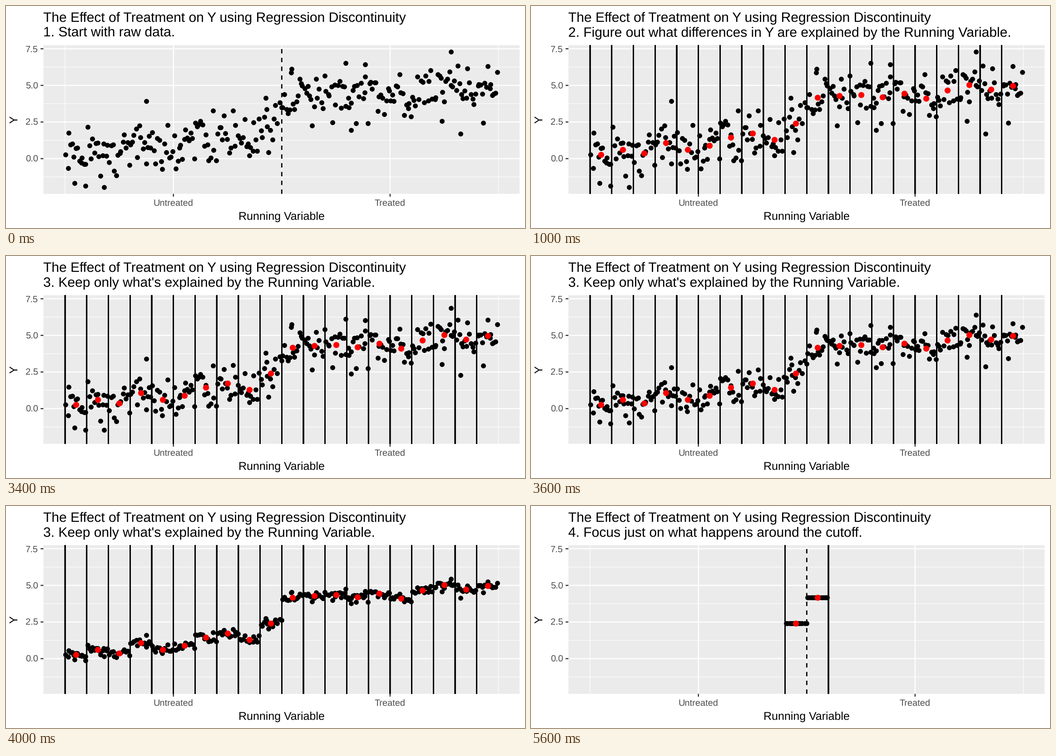
Animation of 1143x490 px, one loop 8000 ms. Source, as a matplotlib script:

```python
import numpy as np
import matplotlib.pyplot as plt
from matplotlib.animation import FuncAnimation

W, H, DPI = 1143, 490, 100
STEP_MS, LOOP_MS = 100, 8000
LEFT, RIGHT, TOP, BOTTOM = 82.4, 1131.1, 86.5, 414.6
X0, BIN_W, BINS = 130.1, 47.72, 20
ZERO_Y, UNIT = 336.9, 32.34
PX = 72 / DPI
LINE = 2.42

plt.rcParams["font.family"] = "Liberation Sans"
plt.rcParams["text.hinting"] = "none"
plt.rcParams["text.hinting_factor"] = 1

TITLE = "The Effect of Treatment on Y using Regression Discontinuity"
CAPTIONS = [
    (0, "1. Start with raw data."),
    (500, "2. Figure out what differences in Y are explained"
          " by the Running Variable."),
    (3100, "3. Keep only what's explained by the Running Variable."),
    (5600, "4. Focus just on what happens around the cutoff."),
]
BINS_AT, MOVE_AT, MOVE_STEPS, FOCUS_AT = 1000, 3000, 14, 5600

MEANS = np.array([.29, .63, .38, 1.08, .63, .88, 1.46, 1.72, 1.30, 2.42,
                  4.18, 4.28, 4.35, 4.19, 4.45, 4.12, 4.68, 5.03, 4.72, 4.99])
# Most extreme points: position along the axis in bins, and Y
OUTLIERS = [(0.43, -1.67), (0.95, -1.86), (1.8, -1.95), (3.74, 3.92),
            (9.25, 4.13), (10.45, 6.13), (12.95, 6.52), (13.2, 1.95),
            (13.86, 6.44), (17.4, 2.57), (17.82, 7.28), (18.26, 1.71),
            (19.3, 2.45)]
PER_BIN = 13


def to_x(pos):
    return X0 + BIN_W * np.asarray(pos)


def to_y(value):
    return ZERO_Y - UNIT * np.asarray(value)


def make_points():
    """Evenly jittered positions, normal noise around each bin's mean."""
    rng = np.random.default_rng(12)
    pts = list(OUTLIERS)
    for b, mean in enumerate(MEANS):
        slots = (np.arange(PER_BIN) + rng.uniform(0.1, 0.9, PER_BIN)) / PER_BIN
        noise = np.clip(rng.normal(0, 0.9, PER_BIN), -1.7, 1.7)
        pts += zip(b + slots, mean + noise - noise.mean())
    return np.array(pts).T


pos, value = make_points()
bins = pos.astype(int)
near = np.isin(bins, (9, 10))
centers = np.column_stack([to_x(np.arange(BINS) + 0.5), to_y(MEANS)])
edges = to_x(np.arange(BINS))

fig = plt.figure(figsize=(W / DPI, H / DPI), dpi=DPI, facecolor="white")
ax = fig.add_axes([0, 0, 1, 1])
ax.set_xlim(0, W)
ax.set_ylim(H, 0)
ax.axis("off")


def line(xs, ys, color, width, z, **kw):
    return ax.plot(xs, ys, color=color, lw=width * PX, zorder=z, snap=False,
                   solid_capstyle="butt", dash_capstyle="butt", **kw)[0]


def label(x, y, text, size, color="black", **kw):
    return ax.text(x, y, text, fontsize=size * PX, color=color,
                   va="baseline", **kw)


def dots(size, color, z):
    return ax.scatter([], [], s=(size * PX) ** 2, c=color,
                      linewidths=0, zorder=z, snap=False)


def bars(xs):
    # Repeated strokes give the hard edges of overplotted lines
    return ax.vlines(np.repeat(xs, 8), TOP, BOTTOM, color="black",
                     lw=LINE * PX, zorder=5, snap=False)


ax.add_patch(plt.Rectangle((LEFT, TOP), RIGHT - LEFT, BOTTOM - TOP,
                           fc="#EBEBEB", ec="none", zorder=0, snap=False))
for v in (-1.25, 1.25, 3.75, 6.25):
    line([LEFT, RIGHT], [to_y(v)] * 2, "white", LINE / 2, 1)
for k in (0, 10, 20):
    line([to_x(k)] * 2, [TOP, BOTTOM], "white", LINE / 2, 1)
for v in (0, 2.5, 5, 7.5):
    y = to_y(v)
    line([LEFT, RIGHT], [y, y], "white", LINE, 2)
    line([LEFT - 6.2, LEFT], [y, y], "#333333", LINE, 2)
    label(71, y + 7.1, f"{v:.1f}", 20, "#4D4D4D", ha="right")
for k, name in ((5, "Untreated"), (15, "Treated")):
    x = to_x(k)
    line([x, x], [TOP, BOTTOM], "white", LINE, 2)
    line([x, x], [BOTTOM, BOTTOM + 6.2], "#333333", LINE, 2)
    label(x, 440.8, name, 20, "#4D4D4D", ha="center")

label(82.4, 35, TITLE, 29.9)
caption = label(82.4, 67.4, "", 29.9)
label(606.8, 471.6, "Running Variable", 24.8, ha="center")
ax.text(30.3, 250.5, "Y", fontsize=24.8 * PX, rotation=90,
        ha="right", va="center")

black = dots(10.9, "black", 4)
red = dots(13.3, "red", 6)
all_bars = bars(edges)
near_bars = bars(edges[[9, 11]])
cutoff = line([edges[10]] * 2, [BOTTOM, TOP], "black", LINE * 1.15, 5,
              dashes=(3.48, 3.48))


def draw(i):
    t = i * STEP_MS
    focus = t >= FOCUS_AT
    binned = t >= BINS_AT
    caption.set_text([text for start, text in CAPTIONS if t >= start][-1])

    p = np.clip((t - MOVE_AT) / (MOVE_STEPS * STEP_MS), 0, 1)
    ease = (1 - np.cos(np.pi * p)) / 2
    moved = value + (MEANS[bins] - value) * ease
    xy = np.column_stack([to_x(pos), to_y(moved)])

    black.set_offsets(xy[near] if focus else xy)
    red.set_offsets(centers[9:11] if focus else centers)
    red.set_visible(binned)
    all_bars.set_visible(binned and not focus)
    near_bars.set_visible(focus)
    cutoff.set_visible(focus or not binned)
    return black, red, all_bars, near_bars, cutoff, caption


anim = FuncAnimation(fig, draw, frames=LOOP_MS // STEP_MS, interval=STEP_MS,
                     init_func=lambda: draw(0), repeat=True, repeat_delay=0)
plt.show()
```
